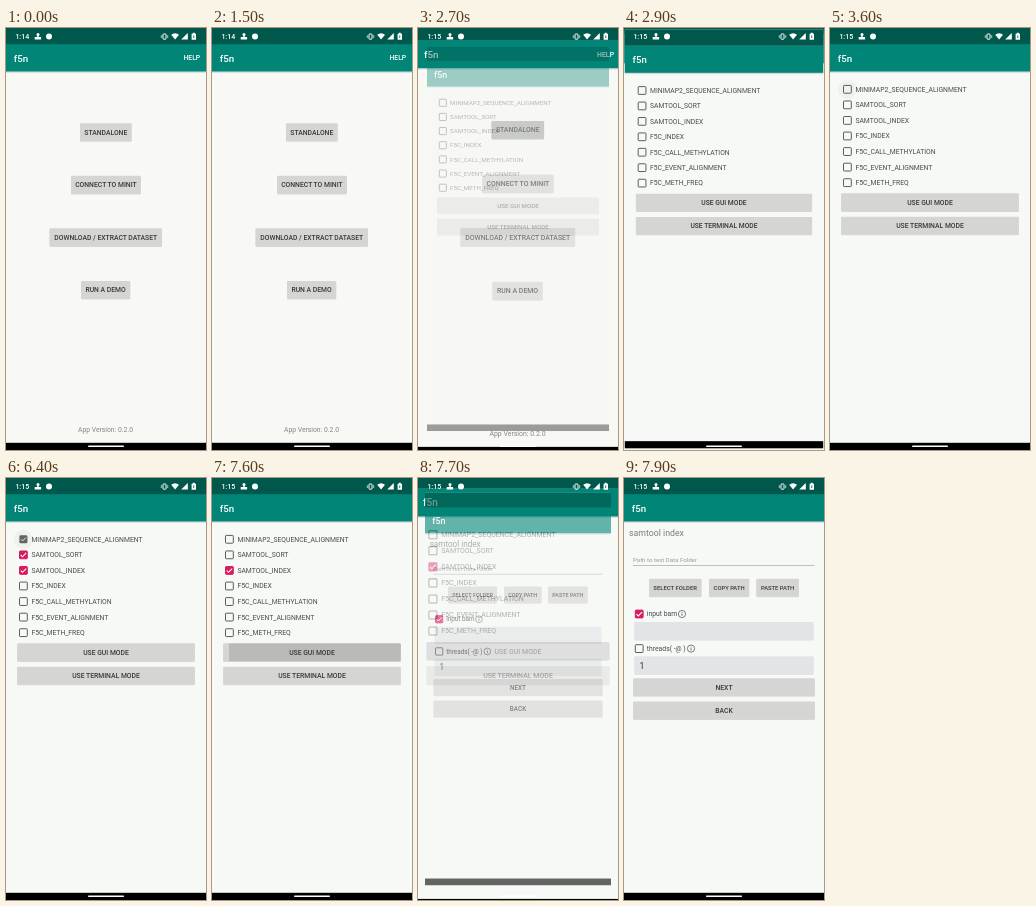
These frames come from a looping animation (200 px wide and 422 px high, 8000 ms). An HTML page:

```html
<!DOCTYPE html>
<html lang="en">
<head>
<meta charset="utf-8">
<title>f5n</title>
<style>
html, body { margin: 0; width: 100%; height: 100%; overflow: hidden; background: #f8f8f5; }
svg { display: block; width: 100vw; height: 100vh; }
text { font-family: Roboto, "Noto Sans", sans-serif; font-size: 6.81px; fill: #484a49; white-space: pre; }
.med { font-weight: 500; }
.btn { font-weight: 500; fill: #363837; text-anchor: middle; }
</style>
</head>
<body>
<svg id="stage" viewBox="0 0 200 422"></svg>
<script>
const LOOP = 8000, STEP = 100;
const NS = 'http://www.w3.org/2000/svg';
const ACCENT = '#d81b60';
const stage = document.getElementById('stage');

function add(parent, tag, attrs = {}, content) {
  const el = document.createElementNS(NS, tag);
  for (const k in attrs) el.setAttribute(k, attrs[k]);
  if (content !== undefined) el.textContent = content;
  parent.append(el);
  return el;
}
const set = (el, attrs) => { for (const k in attrs) el.setAttribute(k, attrs[k]); };
const rect = (p, x, y, width, height, fill, rx = 0) =>
  add(p, 'rect', { x, y, width, height, fill, rx });
const label = (p, x, cy, str, attrs = {}) =>
  add(p, 'text', { x, y: cy + 2.4, ...attrs }, str);

const defs = add(stage, 'defs');
const grad = add(defs, 'linearGradient', { id: 'shade', x2: 0, y2: 1 });
add(grad, 'stop', { offset: 0, 'stop-color': '#000', 'stop-opacity': .2 });
add(grad, 'stop', { offset: 1, 'stop-color': '#000', 'stop-opacity': 0 });

function page(bg) {
  const g = add(stage, 'g');
  rect(g, 0, 0, 200, 422, bg);
  rect(g, 0, 43.5, 200, 2, 'url(#shade)');
  rect(g, 0, 16, 200, 27.5, '#008577');
  rect(g, 0, 0, 200, 16.2, '#00574b');
  rect(g, 0, 414.8, 200, 7.2, '#000');
  add(g, 'text', { x: 7.8, y: 33.6, class: 'med', style: 'font-size:9.73px;fill:#fff' }, 'f5n');
  return g;
}

function button(p, x1, x2, y, str, size = 6.81) {
  rect(p, x1, y + .7, x2 - x1, 17.9, '#000', 1).setAttribute('opacity', .13);
  const face = rect(p, x1, y, x2 - x1, 17.9, '#d5d6d4', 1);
  const ink = rect(p, x1, y, x2 - x1, 17.9, '#000', 1);
  ink.setAttribute('opacity', 0);
  label(p, (x1 + x2) / 2, y + 9 + (size - 6.81) * .35, str, { class: 'btn', style: `font-size:${size}px` });
  return { face, ink };
}

function checkbox(p, cx, cy) {
  const halo = add(p, 'circle', { cx, cy, r: 9.6, opacity: 0 });
  const g = add(p, 'g');
  const box = add(g, 'rect', { x: -3.9, y: -3.9, width: 7.8, height: 7.8, rx: .7 });
  const tick = add(g, 'path', { d: 'M-2.7 .1 L-.9 1.9 L2.8 -1.9', fill: 'none', stroke: '#fff', 'stroke-width': 1.05 });
  // look: fill colour (or none), tick shown, scale
  return (fill, ticked, scale, ink = 0) => {
    set(g, { transform: `translate(${cx} ${cy}) scale(${scale})` });
    set(box, { fill: fill || 'none', stroke: fill || '#5b5d5c', 'stroke-width': scale < 1 ? 1.7 : 1 });
    set(tick, { opacity: ticked ? 1 : 0 });
    set(halo, { opacity: ink });
  };
}

function info(p, x, y) {
  add(p, 'circle', { cx: x, cy: y, r: 3.6, fill: 'none', stroke: '#555', 'stroke-width': .75 });
  rect(p, x - .4, y - .5, .8, 2.4, '#555');
  rect(p, x - .4, y - 1.9, .8, .8, '#555');
}

// Home
const home = page('#f8f8f4');
label(home, 194.2, 30, 'HELP', { class: 'med', 'text-anchor': 'end', style: 'fill:#fff' });
const standalone = button(home, 74, 125.6, 95.2, 'STANDALONE');
button(home, 65, 134.8, 147.8, 'CONNECT TO MINIT');
button(home, 43.6, 156, 200.3, 'DOWNLOAD / EXTRACT DATASET');
button(home, 75, 124.2, 252.9, 'RUN A DEMO');
label(home, 99.5, 402, 'App Version: 0.2.0', { 'text-anchor': 'middle', style: 'fill:#858785' });

// Tool list
const list = page('#f7f9f7');
const boxes = ['MINIMAP2_SEQUENCE_ALIGNMENT', 'SAMTOOL_SORT', 'SAMTOOL_INDEX', 'F5C_INDEX',
  'F5C_CALL_METHYLATION', 'F5C_EVENT_ALIGNMENT', 'F5C_METH_FREQ'].map((name, i) => {
  const y = 61.3 + i * 15.56;
  label(list, 25.4, y, name);
  return checkbox(list, 17.4, y);
});
const gui = button(list, 11.2, 188.8, 165.3, 'USE GUI MODE');
button(list, 11.2, 188.8, 188.7, 'USE TERMINAL MODE');

// Tool form
const form = page('#f7f9f7');
add(form, 'text', { x: 5, y: 58.2, style: 'font-size:8.76px;fill:#7b7d7c' }, 'samtool index');
add(form, 'text', { x: 9, y: 84, style: 'font-size:6.1px;fill:#999b9a' }, 'Path to test Data Folder');
rect(form, 9, 87.2, 181.5, .6, '#9a9c9b');
button(form, 25, 77.4, 100.7, 'SELECT FOLDER', 5.95);
button(form, 85, 125.2, 100.7, 'COPY PATH', 5.84);
button(form, 132.4, 174.8, 100.7, 'PASTE PATH', 5.84);
checkbox(form, 15.2, 136)(ACCENT, true, 1);
label(form, 22.8, 136, 'input bam');
info(form, 58, 136);
rect(form, 10.2, 144, 179.6, 18.6, '#e1e5e5');
checkbox(form, 15.2, 170.6)(null, false, 1);
label(form, 22.8, 170.6, 'threads( -@ )');
info(form, 67, 170.6);
rect(form, 10.2, 178.4, 179.6, 18.6, '#e1e5e5');
add(form, 'text', { x: 15.6, y: 191, style: 'font-size:8.76px;fill:#333' }, '1');
button(form, 9.2, 190.8, 200.2, 'NEXT');
button(form, 9.2, 190.8, 223.4, 'BACK');

// System bars
const bars = add(stage, 'g', { fill: '#fff' });
const clock = add(bars, 'text', { x: 9.4, y: 11, class: 'med', style: 'font-size:7px;fill:#fff' });
add(bars, 'circle', { cx: 32, cy: 6.6, r: 1.5 });
add(bars, 'path', { d: 'M31.3 7h1.4v2h2.4v2.6h-6.4V9h2.6z' });
add(bars, 'circle', { cx: 43, cy: 8.6, r: 3 });
rect(bars, 157, 6, 3, 5.2, 'none', .5).setAttribute('stroke', '#fff');
add(bars, 'path', { d: 'M155.3 7.2v2.8M161.7 7.2v2.8', stroke: '#fff', 'stroke-width': .7 });
add(bars, 'path', { d: 'M165.2 6.8Q169.1 3.8 173 6.8L169.1 11.5z' });
add(bars, 'path', { d: 'M181.8 5v6.6h-6.6z' });
add(bars, 'path', { d: 'M185.6 5.7h1.2v-.9h2v.9h1.2v6h-4.4z' });
rect(bars, 187.4, 7.4, .8, 2.6, '#00574b');
rect(bars, 82, 417.6, 36, 1.4, '#fff', .7);

// [box, time, checked]
const taps = [[0, 3600, 1], [1, 4300, 1], [2, 4800, 1], [0, 6400, 0], [1, 6800, 0]];
const HALO = [.03, .07, .07, .04, .02];
const looks = {
  on: [[null, false, 1], [ACCENT, false, .85], [ACCENT, true, 1]],
  off: [['#626463', true, .85], [null, false, .85], [null, false, 1]]
};

// [time, scale in, opacity in, scale out]
const toList = [[2700, .91, .37, 1.02], [2800, .975, 1, 1.05], [2900, .992, 1, 1.05], [3000, 1, 1, 1]];
const toForm = [[7700, .93, .6, 1.03], [7800, .985, 1, 1.05], [7900, 1, 1, 1]];

const last = (rows, t, col = 0) => rows.filter(r => r[col] <= t).pop();
const zoom = (el, s) => set(el, { transform: `translate(100 211) scale(${s}) translate(-100 -211)` });

function open(next, prev, rows, t) {
  const row = last(rows, t);
  next.style.display = row ? '' : 'none';
  zoom(prev, row ? row[3] : 1);
  if (row) {
    zoom(next, row[1]);
    set(next, { opacity: row[2] });
  }
}

function draw(t) {
  clock.textContent = t < 2100 ? '1:14' : '1:15';

  zoom(home, 1);
  zoom(list, 1);
  open(list, home, toList, t);
  if (t < 7700) form.style.display = 'none';
  else open(form, list, toForm, t);

  set(standalone.ink, { opacity: t < 2500 ? 0 : t < 2600 ? .06 : .18 });

  // The press ink spreads leftwards across the wide button.
  const left = t < 7400 ? 110 : t < 7500 ? 70 : t < 7600 ? 38 : t < 7700 ? 17 : 11.2;
  set(gui.ink, { x: left, width: 188.8 - left, opacity: t < 7300 ? 0 : t < 7400 ? .05 : .13 });

  boxes.forEach((paint, i) => {
    const tap = last(taps.filter(r => r[0] === i), t, 1);
    if (!tap) return paint(null, false, 1);
    const age = Math.floor((t - tap[1]) / STEP);
    const look = looks[tap[2] ? 'on' : 'off'][Math.min(age, 2)];
    paint(...look, HALO[age] || 0);
  });
}

const start = performance.now();
function tick() {
  const t = (performance.now() - start) % LOOP;
  draw(Math.floor(t / STEP) * STEP);
  requestAnimationFrame(tick);
}
tick();
</script>
</body>
</html>
```
